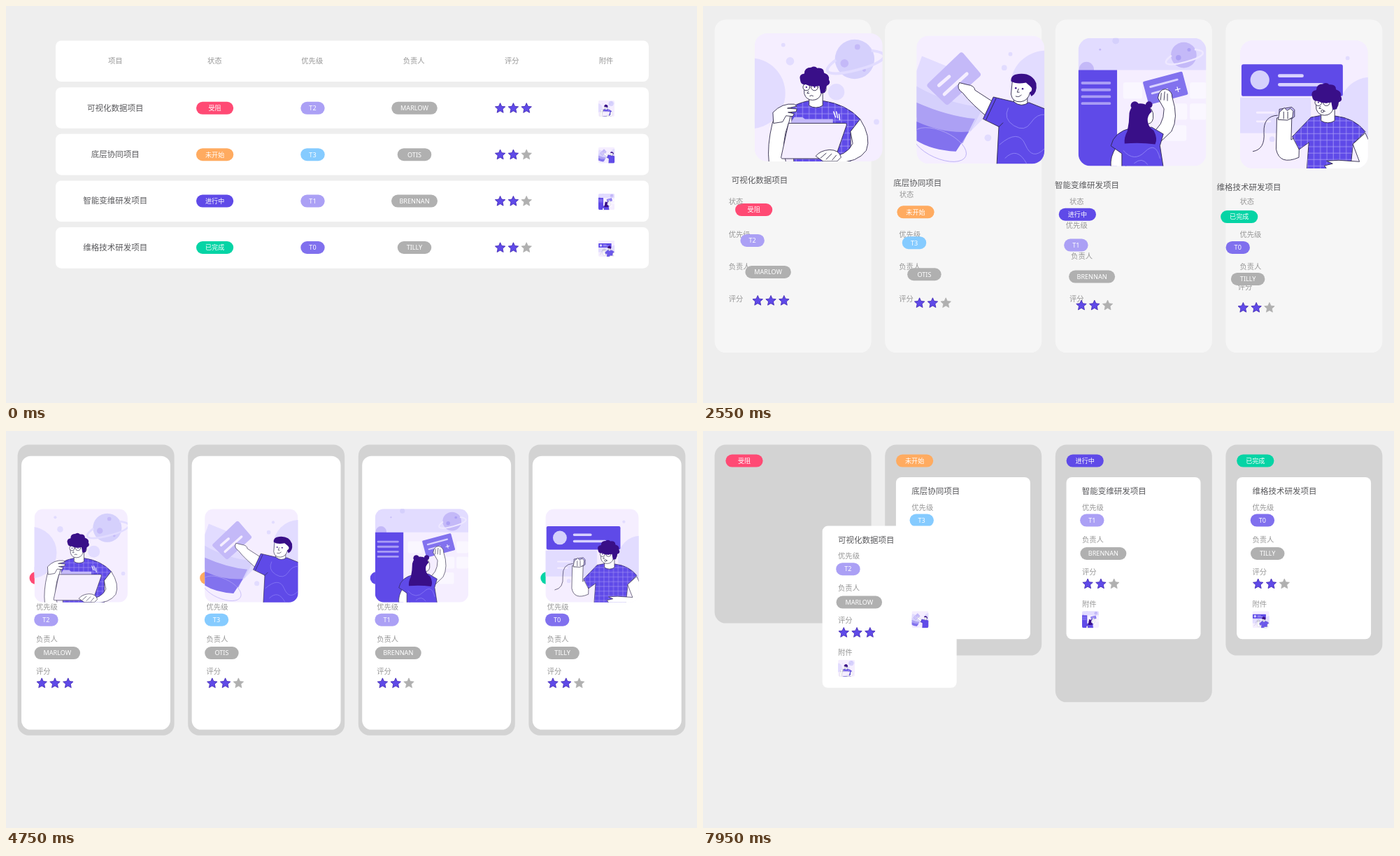
An HTML page for the animation above (8 s loop, 988 by 567 pixels).

```html
<!DOCTYPE html>
<html lang="zh">
<head>
<meta charset="utf-8">
<style>
  html, body { margin: 0; width: 100%; height: 100%; overflow: hidden; background: #eee; }
  svg { display: block; width: 988px; height: 567px; }
  text { font-family: "Noto Sans CJK SC", "Noto Sans CJK JP", "Noto Sans", sans-serif; }
  .title { font-size: 11.5px; font-weight: 500; fill: #59595c; }
  .label { font-size: 10.3px; font-weight: 500; fill: #979797; }
  .pill { font-size: 9.1px; font-weight: 500; fill: #fff; text-anchor: middle; }
  .latin { font-family: "Noto Sans", "Open Sans", sans-serif; }
  .ink { stroke: #2b2545; stroke-width: .9; stroke-linejoin: round; stroke-linecap: round; }
  .bar { fill: none; stroke-linecap: round; }
  .none { fill: none; }
  .white { fill: #fff; }
  .pale { fill: #f5eeff; }
  .mist { fill: #e2dcff; }
  .haze { fill: #d5d0fc; }
  .lilac { fill: #c4b9f8; }
  .violet { fill: #8272ee; }
  .purple { fill: #5f4ae8; }
  .hair { fill: #390f88; }
</style>
</head>
<body>
<svg viewBox="0 0 988 567">
  <defs>
    <clipPath id="round"><rect width="188" height="188" rx="18"/></clipPath>
    <pattern id="grid" width="9.5" height="9.5" patternUnits="userSpaceOnUse">
      <path d="M0 4H9.5M4 0V9.5" class="none" stroke="#a99cf5" stroke-width=".8"/>
    </pattern>
    <g id="planet">
      <circle r="29" class="haze"/>
      <circle cx="-15" cy="6" r="6" class="lilac"/><circle cx="4" cy="-18" r="4" class="lilac"/>
      <circle cx="14" cy="16" r="2.5" class="lilac"/>
      <path d="M-27-6C-58 6-42 16 0 16S58 6 27-6" transform="rotate(-15)" class="none" stroke="#e2dcff" stroke-width="4"/>
    </g>
    <g id="curls">
      <path class="hair" d="M-21 6q-3-9 6-10 0-9 10-9 5-3 9 1 10-1 10 7 9 3 7 10 4 6-3 9l-3 10-6 1-2-11q-11 3-20-2-7 1-8-6z"/>
    </g>
    <g id="face">
      <path class="white ink" d="M-8 22v14q10 6 20 0V18"/>
      <path class="white ink" d="M-16-2l1 21q3 9 12 9 10 0 13-10 8-1 7-8-2-5-7-2l-2-10z"/>
      <path class="none ink" d="M-9 15l-2 3h3M-7 22q3-2 5 0"/>
      <circle cx="-12" cy="9" r="5" class="white ink"/><circle cx="0" cy="9" r="5" class="white ink"/>
      <circle cx="-12" cy="9" r="1.1" class="hair"/><circle cx="0" cy="9" r="1.1" class="hair"/>
    </g>

    <g id="art0" clip-path="url(#round)">
      <rect width="188" height="188" class="pale"/>
      <circle cx="-7" cy="88" r="52" class="mist"/>
      <g class="mist"><circle cx="42" cy="17" r="3"/><circle cx="52" cy="41" r="6"/><circle cx="120" cy="86" r="12"/>
        <circle cx="5" cy="124" r="9"/><circle cx="179" cy="130" r="4"/><circle cx="161" cy="170" r="3"/></g>
      <use href="#planet" x="147" y="38"/>
      <path class="white ink" d="M55 108Q30 112 26 132 18 165 21 190H46Q38 160 50 132z"/>
      <path class="purple ink" d="M54 108Q68 101 80 99q9 9 20 0Q135 104 155 126L141 144v46H58z"/>
      <path fill="url(#grid)" d="M54 108Q68 101 80 99q9 9 20 0Q135 104 155 126L141 144v46H58z"/>
      <use href="#face" x="88" y="70"/><use href="#curls" x="88" y="63"/>
      <path class="lilac" d="M54 130l4-7h12l4 3h41v30H50z"/>
      <path class="white ink" d="M141 144L155 126Q172 152 164 172 152 190 118 190L108 182Q136 180 144 162z"/>
      <path class="pale ink" d="M50 132H133q3 0 2 3L119 181q-1 3-4 3H41q-3 0-2-3z"/>
      <path class="white ink" d="M90 180q6-8 20-9 14 0 17 11l-6 6h-20zM97 183l8-7M105 185l8-8M114 186l6-7"/>
      <path class="white ink" d="M27 116Q40 102 58 104l4 3-14 3 14 1-1 4-12 1 9 2-2 4-10-1-5 9-13 2z"/>
      <path class="bar" stroke="#fff" stroke-width="1.5" d="M119 123l-3-8M122 124l-2-9M125 127l-1-8"/>
    </g>

    <g id="art1" clip-path="url(#round)">
      <rect width="188" height="188" class="pale"/>
      <circle cx="190" cy="74" r="52" class="mist"/>
      <g class="mist"><circle cx="138" cy="27" r="3"/><circle cx="129" cy="47" r="4"/><circle cx="105" cy="150" r="5"/></g>
      <path class="mist" d="M8 30L52 48 108 112 70 150 0 120V52z"/>
      <path class="haze" d="M0 74Q45 100 98 105L80 140 0 120z"/>
      <path fill="#aca0f4" d="M0 98Q45 118 86 122L68 158 0 140z"/>
      <path class="violet" d="M0 126Q40 144 77 141L58 170Q22 168 0 154z"/>
      <ellipse cx="34" cy="160" rx="42" ry="20" transform="rotate(24 34 160)" class="none" stroke="#b3a7f5" stroke-width=".8"/>
      <path class="lilac" d="M63 26q3-3 6 0L93 54q3 3 0 6L48 100q-3 3-6 0L17 76q-3-3 0-6z"/>
      <path class="bar" stroke="#f5eeff" stroke-width="5" d="M33 73L48 60M41 86L74 56"/>
      <path class="white ink" d="M112 126Q80 100 68 84q-10-6-5-15l12 3q10 1 11 8l31 20z"/>
      <path class="white ink" d="M143 84v16q12 8 20 0V80"/>
      <path class="white ink" d="M141 66l-2 20q2 12 14 11 11-1 14-14 7 0 6-8l-8-12z"/>
      <path class="hair" d="M139 67q-1-10 11-11 20-2 26 14 2 14-7 19l-3-5q7-5 1-10l-6-5q-14 3-22-2z"/>
      <circle cx="146" cy="77" r="1.3" class="hair"/><circle cx="156" cy="78" r="1.3" class="hair"/>
      <path class="none ink" d="M150 78l-2 5h3M146 89q5 2 8-2"/>
      <path class="purple ink" d="M98 122L113 90 143 97q11 9 22 1l25 10v82H118l3-56z"/>
      <path class="none" stroke="#8d80f5" d="M135 106q-8 16 8 26t25-4 22-12M122 160q28-24 38 0t28 6M130 180q18-18 32 8"/>
      <path class="none ink" d="M102 124L117 92M121 134l6-6"/>
    </g>

    <g id="art2" clip-path="url(#round)">
      <rect width="188" height="188" class="pale"/>
      <rect width="188" height="47" class="mist"/>
      <circle cx="12" cy="46" r="11" class="lilac"/><circle cx="55" cy="4" r="5" class="haze"/><circle cx="32" cy="17" r="1.5" class="lilac"/>
      <g transform="translate(155 25) scale(.65)"><circle r="29" class="lilac"/>
        <circle cx="-12" cy="6" r="6" fill="#aca0f4"/><circle cx="12" cy="-12" r="4" fill="#aca0f4"/>
        <path d="M-27-6C-58 6-42 16 0 16S58 6 27-6" transform="rotate(-15)" class="none" stroke="#eee8ff" stroke-width="4"/></g>
      <g fill="#faf7ff"><rect x="66" y="65" width="28" height="24" rx="3"/><rect x="164" y="65" width="24" height="24" rx="3"/>
        <rect x="128" y="96" width="32" height="24" rx="3"/><rect x="164" y="96" width="24" height="24" rx="3"/><rect x="128" y="128" width="31" height="23" rx="3"/></g>
      <path class="purple" d="M0 47H57V188H0z"/>
      <path class="bar" stroke="#a99cf5" stroke-width="4" d="M6 66H46M6 76H46M6 86H46M6 96H46"/>
      <g transform="translate(128 73) rotate(-15)">
        <rect x="-30" y="-17" width="60" height="35" rx="2" class="violet"/>
        <path class="bar" stroke="#d9d2ff" stroke-width="3" d="M-21-7H20M-21 3H2"/>
        <path stroke="#fff" stroke-width="1.2" d="M13 7h8M17 3v8"/>
      </g>
      <path class="white ink" d="M106 140Q126 130 126 104L117 88q2-13 11-13 10 2 10 12 10 30-1 50l-18 17z"/>
      <path class="none ink" d="M121 91l1-10M126 91l1-12M131 92v-10"/>
      <path class="white ink" d="M56 160Q46 174 48 190H70V164z"/>
      <path class="purple ink" d="M48 158Q52 138 78 132L108 131 125 141 120 158 125 190H64V170z"/>
      <path class="none" stroke="#8d80f5" d="M66 165q16 18 32 2t22 10M82 184q12-10 20 2"/>
      <path class="white ink" d="M96 100q16 0 14 18-2 10-12 8z"/>
      <circle cx="83" cy="99" r="6" class="hair"/><circle cx="104" cy="98" r="5" class="hair"/>
      <path class="hair" d="M75 110q3-14 16-14 13 0 17 12-7 6-6 14 1 9 9 14 6 12 2 20-22-3-45-1-1-9 4-18 3-14 3-27z"/>
    </g>

    <g id="art3" clip-path="url(#round)">
      <rect width="188" height="188" class="pale"/>
      <circle cx="192" cy="100" r="46" class="mist"/>
      <path class="mist" d="M0 84H104V136H0z"/>
      <circle cx="47" cy="145" r="4" class="mist"/><circle cx="158" cy="26" r="3" class="mist"/>
      <path class="bar" stroke="#f5eeff" stroke-width="3" d="M25 106H50M25 119H44"/>
      <rect x="2" y="35" width="149" height="47" rx="3" class="purple"/>
      <circle cx="29" cy="58" r="14" class="haze"/>
      <path class="bar" stroke="#d9d2ff" stroke-width="5" d="M58 52H91M58 65H120"/>
      <path class="none ink" d="M19 163q18-3 16-28-1-24 20-25"/>
      <path class="white ink" d="M86 172Q58 184 53 160L54 114l22-4-1 36 12-8z"/>
      <path class="purple ink" d="M77 141L104 113 120 110q10 7 20 1Q168 114 184 134L166 152 162 190H98L101 150 87 160z"/>
      <path fill="url(#grid)" d="M77 141L104 113 120 110q10 7 20 1Q168 114 184 134L166 152 162 190H98L101 150 87 160z"/>
      <use href="#face" x="127" y="82"/><use href="#curls" x="127" y="77"/>
      <circle cx="121" cy="104" r="2" class="white ink"/>
      <path class="lilac ink" d="M58 101l18-3 4 4v10l-4 3-18 1z"/>
      <path class="white ink" d="M56 116l2-11 7-6 4 4 5-3 4 4-1 9-7 4zM64 115v-10M70 115v-10"/>
      <path class="white ink" d="M166 152L184 136 195 160V190H128l-4-6 12-3-9-4 18-1 30 2z"/>
    </g>
  </defs>
  <g id="scene"></g>
</svg>
<script>
const LOOP = 8000, PITCH = 243.6;
const MORPHS = [1036, 4236, 7500], MORPH_TIME = 1975;
const DROP = [487.2, 245];

const projects = [
  { title: '可视化数据项目', status: '受阻', color: '#ff4a74', level: 'T2', levelColor: '#aba0f5', owner: 'MARLOW', ownerW: 65.5, stars: 3 },
  { title: '底层协同项目', status: '未开始', color: '#ffab60', level: 'T3', levelColor: '#85cbff', owner: 'OTIS', ownerW: 48.5, stars: 2 },
  { title: '智能变维研发项目', status: '进行中', color: '#5f4ae8', level: 'T1', levelColor: '#aba0f5', owner: 'BRENNAN', ownerW: 66, stars: 2 },
  { title: '维格技术研发项目', status: '已完成', color: '#05d4a5', level: 'T0', levelColor: '#8070ee', owner: 'TILLY', ownerW: 48.5, stars: 2 },
];
// header: table x; home: the column whose label grows out of the table header
const fields = [
  { name: '状态', header: 288, home: 1, gallery: 279 },
  { name: '优先级', header: 422.3, home: 2, gallery: 326, board: 109 },
  { name: '负责人', header: 567.7, home: 2, gallery: 372, board: 155 },
  { name: '评分', header: 713, home: 3, gallery: 418, board: 201 },
  { name: '附件', board: 247 },
];

const clamp = v => Math.max(0, Math.min(1, v));
const fade = (t, from, to) => clamp((t - from) / (to - from));

// cubic-bezier(.219, 0, .365, 1), solved by bisection
function ease(x) {
  let lo = 0, hi = 1;
  for (let n = 0; n < 24; n++) {
    const s = (lo + hi) / 2, r = 1 - s;
    if (.657 * s * r * r + 1.095 * s * s * r + s ** 3 < x) lo = s; else hi = s;
  }
  return lo * lo * (3 - 2 * lo);
}

const parts = [];
let markup = '';
function addPart(html, keys, alpha, attributes) {
  parts.push({ keys, alpha, attributes });
  markup += html;
}
// keys hold one entry per layout: [x, y, scale] for groups, [x, y, w, h, r] for boxes
const add = (body, keys, alpha) => addPart(`<g class="part">${body}</g>`, keys, alpha);
const box = (fill, keys, alpha) =>
  addPart(`<rect class="part" fill="${fill}"/>`, keys, alpha, ['x', 'y', 'width', 'height', 'rx']);
const text = (cls, size, str) => `<text class="${cls}" y="${size * .37}">${str}</text>`;
const label = str => text('label', 10.3, str);
const pill = (w, color, str, cls = '') =>
  `<rect y="-9" width="${w}" height="18" rx="9" fill="${color}"/><text class="pill ${cls}" x="${w / 2}" y="3.3">${str}</text>`;

const starPoints = Array.from({ length: 10 }, (_, k) => {
  const r = k % 2 ? 3.6 : 7.6, a = k * Math.PI / 5;
  return `${(r * Math.sin(a)).toFixed(2)},${(-r * Math.cos(a)).toFixed(2)}`;
}).join(' ');
const stars = count => [0, 1, 2].map(k =>
  `<polygon points="${starPoints}" transform="translate(${k * 18.8} 0)" stroke-width=".8" ` +
  (k < count ? 'fill="#5f4ae8" stroke="#3d22b0"/>' : 'fill="#b0b0b0" stroke="#b0b0b0"/>')).join('');

const leaveTable = t => 1 - fade(t, 700, 1500);
const labelsIn = t => fade(t, 1750, 2550);
const cardsIn = t => fade(t, 2050, 3050);
const statusOut = t => 1 - fade(t, 4236, 4650);

for (let r = 0; r < 5; r++) box('#fff', [[71, 49.5 + 66.65 * r, 848, 58.6, 8]], leaveTable);
add(label('项目'), [[146, 78.5]], leaveTable);
add(label('附件'), [[847.7, 78.5]], leaveTable);

for (let i = 0; i < 4; i++) {
  const x = 16.6 + PITCH * i, column = h => [x, 19.6, 224, h, 16];
  box('#d3d3d3', [column(475.5), column(475.5), column(301), column([139, 301, 536, 301][i])], t => +(t >= 4236));
}

// The first card comes last because it is lifted over its neighbours.
for (const i of [1, 2, 3, 0]) {
  const p = projects[i], dx = PITCH * i, rowY = 145.8 + 66.4 * i;
  const lift = k => i ? k : [k[0] + DROP[0], k[1] + DROP[1], ...k.slice(2)];
  const path = (a, b, c) => [a, b, c, lift(c)];

  const full = [16.6 + dx, 19.6, 224, 475.5, 16];
  box('#fff', path(full, full, [32.3 + dx, 66, 192, 231.3, 8]), cardsIn);
  add(pill(53.2, p.color, p.status), [[272, rowY], [34.1 + dx, 298.7], [32.4 + dx, 42.6]]);
  fields.forEach(f => {
    const end = [54.7 + dx, f.board ?? f.gallery];
    const mid = f.gallery ? [36.7 + dx, f.gallery] : end;
    if (!f.board) end[0] = mid[0];
    const moving = f.home === i;
    const arrive = f.gallery ? (moving ? () => 1 : labelsIn) : t => fade(t, 5000, 5700);
    add(label(f.name), path(moving ? [f.header, 78.5] : mid, mid, end),
      f.board ? arrive : t => arrive(t) * statusOut(t));
  });
  add(pill(34.4, p.levelColor, p.level, 'latin'), path([421.3, rowY], [34 + dx, 344.9], [51.9 + dx, 127.6]));
  add(pill(p.ownerW, '#b0b0b0', p.owner, 'latin'), path([584 - p.ownerW / 2, rowY], [34.4 + dx, 392.3], [52.2 + dx, 175]));
  add(stars(p.stars), path([706.6, rowY + .4], [45 + dx, 435.6], [62.9 + dx, 218.6]));
  add(text('title', 11.5, p.title),
    path([156.2 - p.title.length * 5.75, rowY - .4], [36.7 + dx, 254.5], [54.6 + dx, 86]));
}
for (let i = 0; i < 4; i++) {
  const dx = PITCH * i, end = [54.8 + dx, 257.2, 24 / 188];
  add(`<use href="#art${i}"/>`, [[847, 134.7 + 66.7 * i, 23.2 / 188], [33 + dx, 34, 191.3 / 188], end,
    i ? end : [end[0] + DROP[0], end[1] + DROP[1], end[2]]]);
}

document.getElementById('scene').innerHTML = markup;
document.querySelectorAll('.part').forEach((el, k) => parts[k].el = el);

function draw(t) {
  const progress = MORPHS.map(start => ease(clamp((t - start) / MORPH_TIME)));
  for (const { el, keys, alpha, attributes } of parts) {
    const v = keys[0].map((start, n) => progress.reduce((value, p, k) =>
      keys[k + 1] ? value + (keys[k + 1][n] - keys[k][n]) * p : value, start));
    if (attributes) attributes.forEach((name, n) => el.setAttribute(name, v[n]));
    else el.setAttribute('transform', `translate(${v[0]} ${v[1]}) scale(${v[2] ?? 1})`);
    if (alpha) el.setAttribute('opacity', alpha(t));
  }
}

const begin = performance.now();
function tick() {
  draw((performance.now() - begin) % LOOP);
  requestAnimationFrame(tick);
}
tick();
</script>
</body>
</html>
```
